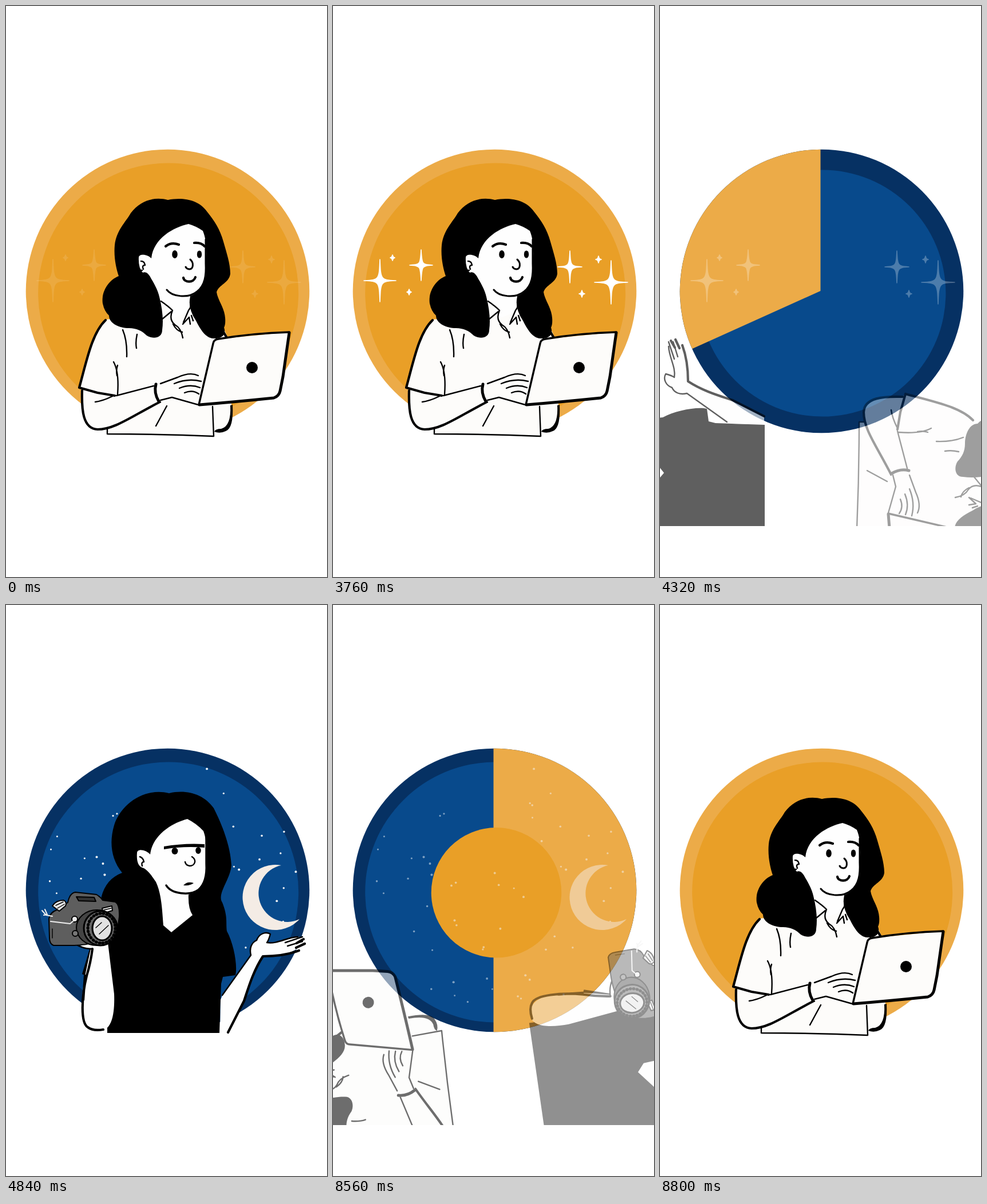
Write an HTML page that moves like this. It is 561 by 998 pixels and loops after 9 s.

```html
<!DOCTYPE html>
<html lang="en">
<head>
<meta charset="utf-8">
<title>Day and night</title>
<style>
html, body { margin: 0; height: 100%; overflow: hidden; background: #fff; }
svg { display: block; width: 100vw; height: 100vh; }
.person { stroke-linecap: round; stroke-linejoin: round; }
.ink { fill: none; stroke: #000; stroke-width: 2.4; }
.bold { fill: none; stroke: #000; stroke-width: 4.2; }
.paper { fill: #fdfcfa; stroke: none; }
.skin { fill: #fefefe; stroke: none; }
.light { fill: none; stroke: #eee; stroke-width: 2; }
</style>
</head>
<body>
<svg viewBox="0 0 561 998">
  <defs>
    <clipPath id="outerClip"><polygon id="outerWedge"/></clipPath>
    <clipPath id="innerClip"><polygon id="innerWedge"/></clipPath>
    <clipPath id="floor"><rect width="561" height="909"/></clipPath>
  </defs>

  <g id="nightDisc">
    <circle cx="282.5" cy="498.5" r="247.8" fill="#063163"/>
    <circle cx="-3.5" cy="-1.5" r="227.5" fill="#084a8c" id="nightInner"/>
  </g>
  <g clip-path="url(#outerClip)"><circle cx="282.5" cy="498.5" r="247.8" fill="#ecab48"/></g>
  <g clip-path="url(#innerClip)"><circle cx="-3.5" cy="-1.5" r="227.5" fill="#e99f27" id="dayInner"/></g>
  <path id="sparkles" fill="#fff" stroke="#fff" stroke-width="1.6" stroke-linejoin="round"/>
  <g id="sky" fill="#f4f6f8">
    <path fill="#f4ece5" d="M481,455A57,57 0 1 0 513,549A50,50 0 1 1 481,455Z"/>
  </g>

  <g clip-path="url(#floor)">
    <g id="night" class="person">
      <!-- hair and shirt -->
      <path d="M285,329C240,318 200,350 189,385C180,415 184,445 203,468C181,476 168,495 165,520L148,595L133,645L141,649L177,740V748H373L376,662L379,650L401,647C405,630 398,592 386,570C384,555 388,545 378,520C368,505 392,480 394,455C392,420 378,385 363,355C345,330 315,322 285,329Z"/>
      <!-- face and neck -->
      <path class="skin" d="M317,374C290,381 256,402 252,436C245,428 230,425 229,433C228,445 230,456 238,459C246,461 254,472 262,484C272,505 273,535 275,560L289,572L326,542Q318,530 319,506C337,500 350,486 350,455C351,425 350,408 345,395Q333,382 317,374Z"/>
      <path class="bold" style="stroke-width:3.4" d="M280,490C290,506 322,508 336,498C348,488 351,470 350,452V405"/>
      <path class="ink" d="M234,440Q240,442 241,449Q236,449 238,456M325,440C334,446 330,456 321,456Q314,455 313,449"/>
      <path d="M276,422Q310,416 347,418V424Q310,421 276,427ZM310,490Q317,482 328,486Q322,491 310,490Z"/>
      <ellipse cx="295" cy="430" rx="5.5" ry="6"/>
      <ellipse cx="336" cy="429" rx="4.8" ry="6"/>
      <!-- raised palm -->
      <path class="skin" d="M379,680L428,612C425,600 429,590 438,586C442,575 453,570 462,575Q459,586 456,590C474,593 490,581 510,580L522,583C518,602 490,615 450,614C438,630 425,660 416,690L388,747H374L375,690Z"/>
      <path class="ink" d="M378,682L428,612C425,600 429,590 438,586C442,575 453,570 462,575Q459,586 456,590C474,593 490,581 510,580M488,590L518,580M492,596L518,588"/>
      <path class="bold" d="M520,584L508,591M522,592L507,599M512,604Q485,614 449,614C432,640 424,668 416,692L388,747"/>
      <!-- arm under the camera -->
      <path class="skin" d="M117,585Q132,600 148,601L138,648C130,690 128,745 166,744C188,742 190,705 189,680L178,590Z"/>
      <path class="ink" d="M116,588Q130,601 151,601"/>
      <path class="bold" d="M151,601Q148,625 141,648C132,685 130,730 143,738Q152,745 170,742M138,648L135,690"/>
      <!-- camera -->
      <g stroke="#000" stroke-width="2" transform="translate(-1 0)">
        <path fill="#5e5e5e" d="M76,548Q78,537 90,533L109,520Q112,504 122,502L159,506Q166,510 170,516L192,519Q200,524 199,545L195,574Q160,594 120,595H84Q77,592 77,582Z"/>
        <path fill="#333" d="M124,510L155,511L158,518L128,517Z"/>
        <path fill="#e4e4e4" d="M82,526Q88,516 102,516Q108,520 105,526L94,535Z"/>
        <path fill="#eee" d="M169,530L186,526L187,534L171,539Z"/>
        <ellipse cx="160" cy="564" rx="36" ry="31" fill="#444"/>
        <ellipse cx="166" cy="565" rx="29" ry="30" fill="#666" stroke-width="3"/>
        <ellipse cx="168" cy="565" rx="24" ry="26" fill="none" stroke-width="5" stroke-dasharray="1 5"/>
        <ellipse cx="169" cy="565" rx="17" ry="21" fill="#e2e2e2" stroke-width="3"/>
        <circle cx="121" cy="549" r="5" fill="#eee"/>
        <circle cx="122" cy="574" r="5" fill="#777"/>
        <path fill="none" stroke-width="1.4" d="M158,564L168,555M164,575L180,560M172,533L185,530M88,525L101,519M91,530L103,523M82,566V582M195,520L203,512"/>
      </g>
      <path class="light" d="M78,553L112,557L119,551M63,534L70,542L81,544M68,532L72,541L66,542"/>
    </g>

    <g id="day" class="person">
      <!-- torso and arms -->
      <path class="paper" d="M174,548C150,572 141,620 128,668L133,672C131,705 134,741 160,741L177,738V748L363,752V744Q393,744 394,698L390,585L381,565L340,545L322,500L264,492V540Z"/>
      <path class="bold" d="M174,549C150,572 141,620 128,667L160,676L190,681M133,672C132,705 134,739 160,740C190,740 218,718 269,692M379,568L386,580"/>
      <path class="ink" d="M177,739V748Q270,748 363,752L361,700M193,681L258,664M156,692Q170,690 186,682M188,622Q198,640 195,679M195,628Q192,636 194,646M204,566Q212,585 211,613M229,574Q226,588 228,598M281,699L262,734"/>
      <path d="M392,698L396,697Q398,738 384,743Q374,748 364,744Q366,739 376,739Q394,734 392,698Z"/>
      <!-- hair -->
      <path d="M283,339C262,333 236,338 218,362C209,378 193,392 190,418C188,440 193,460 197,472C179,479 166,500 169,520Q172,534 180,541C180,555 198,563 215,563C228,563 238,568 246,576C255,582 273,582 273,566C276,545 272,520 264,494L321,505Q318,530 332,550C340,566 349,580 362,581C375,582 386,576 381,562Q384,556 383,545C382,528 370,514 368,500C372,487 390,484 392,468C392,450 385,430 380,412C374,390 364,375 351,359C336,338 308,334 283,339Z"/>
      <!-- face, neck and collar -->
      <path class="skin" d="M319,381C292,387 258,406 254,441C248,434 233,432 232,439Q231,458 239,466Q247,462 254,477C262,490 266,500 272,517L291,546L318,535L322,507C338,501 349,488 349,460C351,430 351,410 344,393Q333,385 319,381Z"/>
      <path class="bold" style="stroke-width:3" d="M281,496C290,508 318,512 334,499C348,488 350,470 349,450V408M322,443C329,449 327,460 321,460Q316,460 314,456"/>
      <path class="ink" d="M236,446Q242,446 243,453Q237,453 240,460M234,462H238M271,516Q284,525 291,532Q284,548 295,557Q306,563 309,580M272,548L289,534M292,556Q298,568 308,570M322,518Q325,525 319,532L310,553M324,541L327,550M309,556L320,544L322,556"/>
      <path class="bold" d="M279,420Q289,412 302,417M329,414Q341,413 347,420M310,475C312,484 328,484 331,474"/>
      <ellipse cx="295" cy="434" rx="4.8" ry="7"/>
      <ellipse cx="338" cy="434" rx="4.2" ry="6.6"/>
      <!-- hand -->
      <path class="paper" d="M262,661L300,649Q322,639 336,646L342,657L336,697L290,686L266,692Z"/>
      <path class="bold" style="stroke-width:5" d="M262,661Q258,676 267,691"/>
      <path class="ink" d="M270,660L300,649Q322,639 336,646M270,689L290,684L336,697"/>
      <path class="ink" id="fingers"/>
      <!-- laptop -->
      <path class="paper" d="M362,590Q363,583 371,582L495,570L480,676Q478,683 470,685L337,697Z"/>
      <path class="ink" style="stroke-width:3.4" d="M337,697L362,590Q363,583 371,582Q430,572 495,570"/>
      <path class="bold" style="stroke-width:5" d="M495,571L484,648L479,673Q477,682 468,685Q400,692 338,697"/>
      <circle cx="430" cy="632" r="10"/>
    </g>
  </g>
</svg>
<script>
const LOOP = 9000, STEP = 40;
const $ = id => document.getElementById(id);
const set = (id, name, value) => $(id).setAttribute(name, value);
const ramp = (t, from, to) => Math.min(1, Math.max(0, (t - from) / (to - from)));

function sparkle(x, y, w, h) {
  const c = 1.3;
  const ends = [[0, -h], [w, 0], [0, h], [-w, 0]];
  const bends = [[c, -c], [c, c], [-c, c], [-c, -c]];
  const at = ([dx, dy]) => `${x + dx},${y + dy}`;
  return 'M' + at(ends[0]) + bends.map((b, i) =>
    `C${at(b)} ${at(b)} ${at(ends[(i + 1) % 4])}`).join('') + 'Z';
}

// Each sparkle has a near mirror image on the other side
const sparkles = [[82, 480, 28, 37], [154, 453, 20, 27], [104, 440, 4, 5], [133, 500, 4, 5]];
set('sparkles', 'd', sparkles.map(([x, y, w, h]) =>
  sparkle(x, y, w, h) + sparkle(568 - x, y + 3, w + 1, h + 1)).join(''));

set('fingers', 'd', [0, 1, 2].map(i =>
  `M${294 + 9 * i},${660 + 8 * i}Q${318 + 4 * i},${650 + 10 * i} ${341 - 2 * i},${656 + 11 * i}`).join(''));

let seed = 11;
function random() {
  seed = seed * 16807 % 2147483647;
  return seed / 2147483647;
}
let stars = '';
for (let i = 0; i < 58; i++) {
  const angle = 2 * Math.PI * random();
  const reach = 225 * Math.sqrt(random());
  const x = 284 + reach * Math.cos(angle);
  const y = 495 + reach * Math.sin(angle);
  stars += `<circle cx="${x}" cy="${y}" r="${1.4 + 0.7 * random()}"/>`;
}
$('sky').insertAdjacentHTML('afterbegin', stars);

// Clockwise sector between two turns, measured from twelve o'clock
function wedge(id, from, to) {
  const points = ['280.5,498'];
  for (let i = 0; i <= 32; i++) {
    const a = 2 * Math.PI * (from + (to - from) * i / 32);
    points.push(`${280.5 + 400 * Math.sin(a)},${498 - 400 * Math.cos(a)}`);
  }
  set(id, 'points', points.join(' '));
}

function disc(id, scale) {
  set(id, 'transform', `translate(287.2 503.5) scale(${scale})`);
}

function person(id, angle, opacity, pivot) {
  set(id, 'transform', `rotate(${angle} ${pivot})`);
  set(id, 'opacity', opacity);
}

function draw(t) {
  const returning = t >= 8360;
  const turn = returning ? ramp(t, 8360, 8800) : ramp(t, 3880, 4760);
  const rise = ramp(t, 8360, 8760);

  wedge('outerWedge', returning ? 0 : ramp(t, 4062, 4440), returning ? rise : 1);
  wedge('innerWedge', returning ? 0 : ramp(t, 3880, 4257), 1);
  disc('dayInner', returning ? rise : 1);
  disc('nightInner', ramp(t, 3960, 4340));
  set('nightDisc', 'opacity', t > 3880 && rise < 1 ? 1 : 0);

  set('sparkles', 'opacity', ramp(t, -40, 320) * (1 - ramp(t, 4000, 4440)));
  set('sky', 'opacity', ramp(t, 4440, 4840) * (1 - rise));

  const fade = Math.min(1, turn * 1.25);
  const leaving = [180 * turn, 1 - fade];
  const arriving = [180 * turn - 180, fade];
  person('day', ...(returning ? arriving : leaving), '273 823');
  person('night', ...(returning ? leaving : arriving), '270 835');
}

function tick() {
  const t = performance.now() % LOOP;
  draw(Math.floor(t / STEP) * STEP);
  requestAnimationFrame(tick);
}
tick();
</script>
</body>
</html>
```
